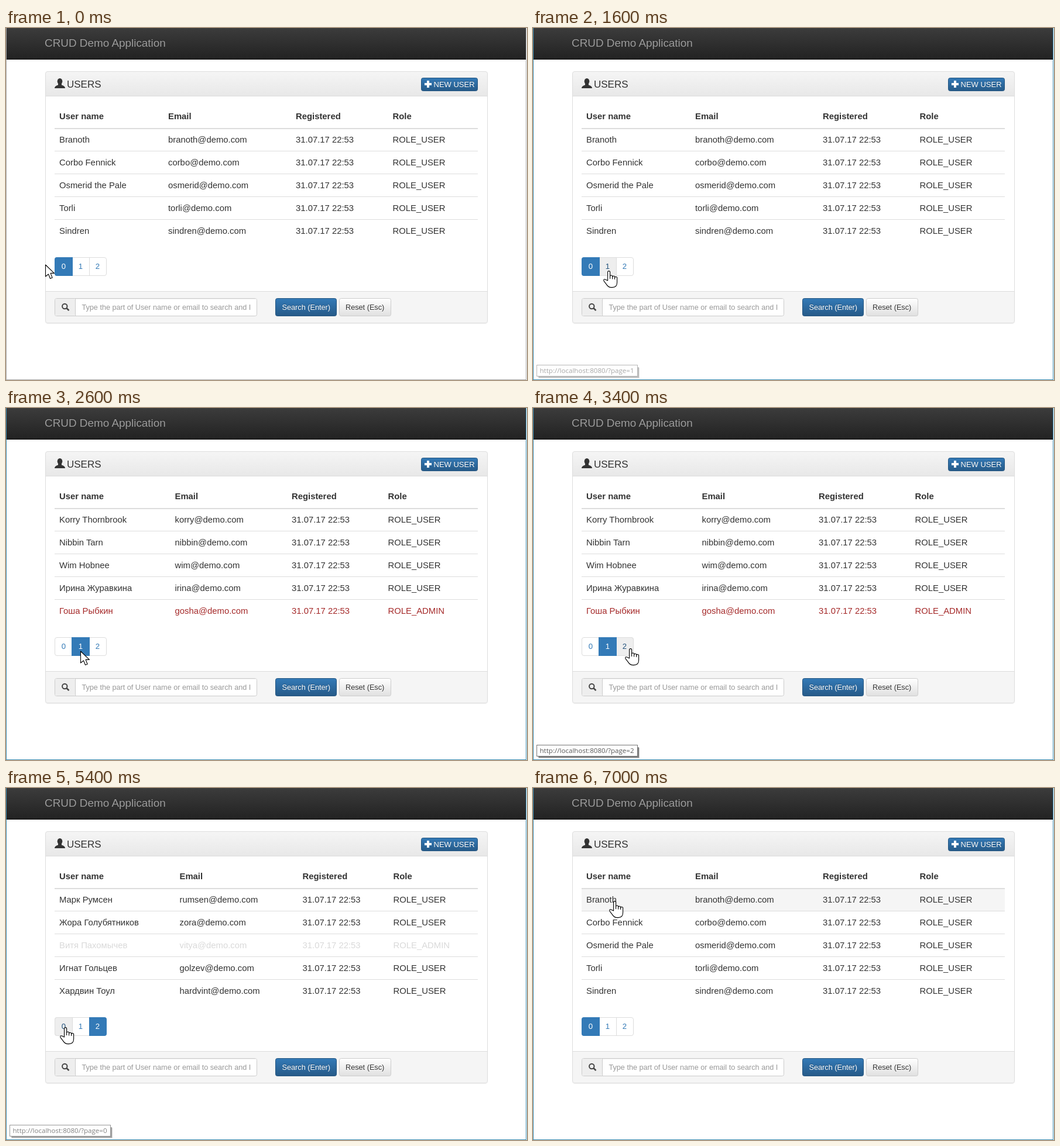
These frames come from a looping animation (890 by 602 pixels, 8 s). An HTML page:

```html
<!DOCTYPE html>
<html lang="en">
<head>
<meta charset="utf-8">
<title>CRUD Demo Application</title>
<style>
html, body { margin: 0; width: 100%; height: 100%; overflow: hidden; background: #fff; }
svg { display: block; font-family: "Liberation Sans", Arial, sans-serif; }
text { white-space: pre; }
</style>
</head>
<body>
<svg width="890" height="602" viewBox="0 0 890 602">
  <defs>
    <linearGradient id="nav" x2="0" y2="1"><stop stop-color="#3c3c3c"/><stop offset="1" stop-color="#222"/></linearGradient>
    <linearGradient id="head" x2="0" y2="1"><stop stop-color="#f5f5f5"/><stop offset="1" stop-color="#e8e8e8"/></linearGradient>
    <linearGradient id="blue" x2="0" y2="1"><stop stop-color="#337ab7"/><stop offset="1" stop-color="#265a88"/></linearGradient>
    <linearGradient id="pale" x2="0" y2="1"><stop stop-color="#fff"/><stop offset="1" stop-color="#e0e0e0"/></linearGradient>
    <clipPath id="field"><rect x="119" y="462" width="299" height="31"/></clipPath>
    <clipPath id="pager"><rect x="83" y="392" width="89" height="32" rx="4"/></clipPath>
  </defs>
  <g id="scene"></g>
</svg>
<script>
const LOOP = 8000, TICK = 200;
const INK = '#333', LINE = '#ddd', LINK = '#337ab7';
const DATE = '31.07.17 22:53';

const pages = [
  { cols: [91, 277, 495, 660.5], rows: [
    ['Branoth', 'branoth'], ['Corbo Fennick', 'corbo'], ['Osmerid the Pale', 'osmerid'],
    ['Torli', 'torli'], ['Sindren', 'sindren']] },
  { cols: [91, 288.5, 488, 652.5], rows: [
    ['Korry Thornbrook', 'korry'], ['Nibbin Tarn', 'nibbin'], ['Wim Hobnee', 'wim'],
    ['Ирина Журавкина', 'irina'], ['Гоша Рыбкин', 'gosha', 'ADMIN', '#a52a2a']] },
  { cols: [91, 296.5, 506.5, 661.5], rows: [
    ['Марк Румсен', 'rumsen'], ['Жора Голубятников', 'zora'],
    ['Витя Пахомычев', 'vitya', 'ADMIN', '#d9d9d9'],
    ['Игнат Гольцев', 'golzev'], ['Хардвин Тоул', 'hardvint']] }
];

// Each key: start time, number of ticks to get there, values reached.
const pointerKeys = [
  [0, 1, 67, 404], [200, 3, 127, 415], [2800, 4, 164, 411],
  [4400, 3, 99, 409], [6000, 1, 101, 394], [6400, 4, 137, 193]
];
const tipKeys = [
  [0, 1, 0], [600, 2, 1], [1600, 1, .52], [1800, 5, 0], [3000, 3, 1], [3800, 2, 0],
  [4600, 2, 1], [5400, 1, .75], [5600, 1, .45], [6000, 1, .2], [6400, 1, 0]
];

function track(keys, t) {
  let now = keys[0].slice(2);
  for (const [start, ticks, ...to] of keys) {
    if (t < start) break;
    const k = Math.min(1, (Math.floor((t - start) / TICK) + 1) / ticks);
    now = now.map((v, i) => v + (to[i] - v) * k);
  }
  return now;
}

const rect = (x, y, w, h, fill, more = '') =>
  `<rect x="${x}" y="${y}" width="${w}" height="${h}" fill="${fill}" ${more}/>`;
const box = (x, y, w, h, fill, line, r = 3) =>
  rect(x + .5, y + .5, w - 1, h - 1, fill, `stroke="${line}" rx="${r}"`);
const text = (x, y, str, size, fill, more = '') =>
  `<text x="${x}" y="${y}" font-size="${size}" fill="${fill}" ${more}>${str}</text>`;
const path = (d, more = '') => `<path d="${d}" ${more}/>`;
const move = (x, y, inner) => `<g transform="translate(${x} ${y})">${inner}</g>`;
const shadow = (dy, color) => `style="text-shadow:0 ${dy}px 0 ${color}"`;
const DARK = shadow(-1, 'rgba(0,0,0,.25)');

function linkAt(x, y) {
  if (x < 83 || x >= 172 || y < 392 || y >= 424) return -1;
  return x < 113 ? 0 : x < 142 ? 1 : 2;
}

function rowAt(x, y) {
  return x >= 83 && x < 806 && y >= 172 && y < 366 ? Math.floor((y - 172) / 39) : -1;
}

function frame(active) {
  const c = active ? '#3a8db3' : '#a9a9a9';
  return rect(0, 0, 1, 602, c) + rect(888, 0, 1, 602, c) + rect(0, 601, 889, 1, c);
}

function heading(icons, drop) {
  const left = icons ? 709 : 715;
  const user = '<ellipse cx="92" cy="91.3" rx="4.3" ry="5.4"/>' +
    path('M83 103q0-4 6-5.6v-3h6v3q6 1.6 6 5.6z');
  const plus = icons
    ? rect(719, 90, 4, 12, '#fff') + rect(715, 94, 12, 4, '#fff')
    : text(720.5, 101, '+', 13, '#fff');
  return rect(68, 75, 754, 41 + drop, 'url(#head)') + rect(68, 116 + drop, 754, 1, LINE) +
    (icons ? `<g fill="${INK}">${user}</g>` : '') +
    text(104, 102 + drop, 'USERS', 17, INK) +
    box(left, 85, 806 - left, 23, 'url(#blue)', '#245580') + plus +
    text(730.5, 101, 'NEW USER', 13, '#fff', DARK);
}

function table(page, hover, icons) {
  const { cols, rows } = pages[page];
  let out = ['User name', 'Email', 'Registered', 'Role'].map((s, i) =>
    text(cols[i], icons ? 156 : 157, s, 14.85, INK, 'font-weight="bold"')).join('');
  if (hover >= 0) out += rect(83, 173 + 39 * hover, 723, 38, '#f5f5f5');
  out += rect(83, 171, 723, 2, LINE);
  rows.forEach(([name, mail, role = 'USER', color = INK], i) => {
    if (i) out += rect(83, 171 + 39 * i, 723, 1, LINE);
    out += [name, mail + '@demo.com', DATE, 'ROLE_' + role]
      .map((s, c) => text(cols[c], 196 + 39 * i, s, 14.85, color)).join('');
  });
  return out;
}

function pager(page, hover) {
  const fill = (i, c) =>
    rect(83 + 29 * i + (i > 1), 392, 31 - (i > 1), 32, c, 'clip-path="url(#pager)"');
  let out = hover >= 0 ? fill(hover, '#eee') : '';
  out += box(83, 392, 89, 32, 'none', LINE, 3.5);
  out += rect(hover === 0 ? 113 : 112, 392, 1, 32, LINE) + rect(142, 392, 1, 32, LINE);
  out += fill(page, LINK);
  for (let i = 0; i < 3; i++) {
    const c = i === page ? '#fff' : i === hover ? '#23527c' : LINK;
    out += text(98.3 + 29 * i, 412, i, 13.2, c, 'text-anchor="middle"');
  }
  return out;
}

function footer(icons) {
  const lens = '<circle cx="100.3" cy="476" r="4.2" fill="none" stroke="#444" stroke-width="2"/>' +
    path('M103.5 479.2l4 4', 'stroke="#444" stroke-width="2.6"');
  return rect(68, 450, 754, 54, '#f5f5f5', 'rx="3"') + rect(68, 450, 754, 9, '#f5f5f5') +
    rect(68, 450, 754, 1, LINE) +
    box(83, 462, 346, 31, '#fff', '#ccc') + rect(84, 463, 34, 29, '#eee', 'rx="2"') +
    rect(118, 462, 1, 31, '#ccc') + rect(119, 463, 309, 1, '#eee') + (icons ? lens : '') +
    `<g clip-path="url(#field)">${text(129.5, 482, 'Type the part of User name or email to search and I', 12.65, '#999')}</g>` +
    box(460, 462, 105, 31, 'url(#blue)', '#245580') +
    text(471.5, 482, 'Search (Enter)', 12.7, '#fff', DARK) +
    box(569, 462, 89, 31, 'url(#pale)', '#ccc') +
    text(580, 482, 'Reset (Esc)', 12.7, INK, shadow(1, '#fff'));
}

function tooltip(opacity, page) {
  if (opacity < .01) return '';
  return `<g opacity="${opacity}">` +
    rect(10, 581, 172, 18, '#000', 'opacity=".18"') + rect(9, 580, 172, 18, '#000', 'opacity=".4"') +
    box(6, 576, 173, 20, '#fff', '#767676', 0) +
    text(11.5, 590.3, 'http://localhost:8080/?page=' + page, 11.6, '#575757',
      'font-family="Open Sans, Noto Sans, sans-serif"') + '</g>';
}

function pointer(hand, x, y) {
  const pen = 'fill="#fff" stroke="#000" stroke-width="1.1" stroke-linejoin="round"';
  if (!hand) return move(x, y, path('M.5 1V21l5-4 3 7.5 3.6-1.5-3-7.6h6.3z', pen));
  const knuckle = 'a2 2 0 0 1 4 .9v.3';
  return move(x - 7, y,
    path('M7.6 17V2.6a2 2 0 0 1 4 0v7' + knuckle.repeat(3) +
      'V20q0 8.6-8 8.6h-2q-5 0-8-5L1 17.6q-1-4 3-2.4z', pen) +
    [0, 1, 2].map(i => path(`M${11.6 + 4 * i} ${9.6 + 1.2 * i}V${14 + i / 2}`, pen)).join(''));
}

function draw(t) {
  const page = t < 2000 ? 0 : t < 3800 ? 1 : t < 5600 ? 2 : 0;
  const icons = t !== 2000 && t !== 3800;
  const tipPage = t < 2800 ? 1 : t < 4400 ? 2 : 0;
  const [x, y] = track(pointerKeys, t).map(Math.round);
  const [tip] = track(tipKeys, t);
  const link = linkAt(x, y), row = rowAt(x, y), drop = icons ? 0 : -2;
  const hand = row >= 0 || (link >= 0 && link !== page);
  return rect(0, 0, 890, 602, '#fff') +
    rect(1, 0, 887, 53, 'url(#nav)') + rect(1, 53, 887, 1, '#080808') +
    text(66, 32, 'CRUD Demo Application', 18.9, '#9d9d9d', DARK) +
    rect(67, 76, 756, 430 + drop, '#000', 'rx="4" opacity=".05"') +
    rect(67, 74, 756, 431 + drop, '#fff', 'rx="4"') +
    heading(icons, drop) +
    move(0, drop, table(page, row, icons) + pager(page, link) + footer(icons)) +
    box(67, 74, 756, 431 + drop, 'none', LINE, 3.5) +
    frame(t >= 1600) + tooltip(tip, tipPage) + pointer(hand, x, y);
}

const scene = document.getElementById('scene');
const start = performance.now();
let shown = -1;

function tick() {
  const t = Math.floor((performance.now() - start) % LOOP / TICK) * TICK;
  if (t !== shown) scene.innerHTML = draw(shown = t);
  requestAnimationFrame(tick);
}
tick();
</script>
</body>
</html>
```
